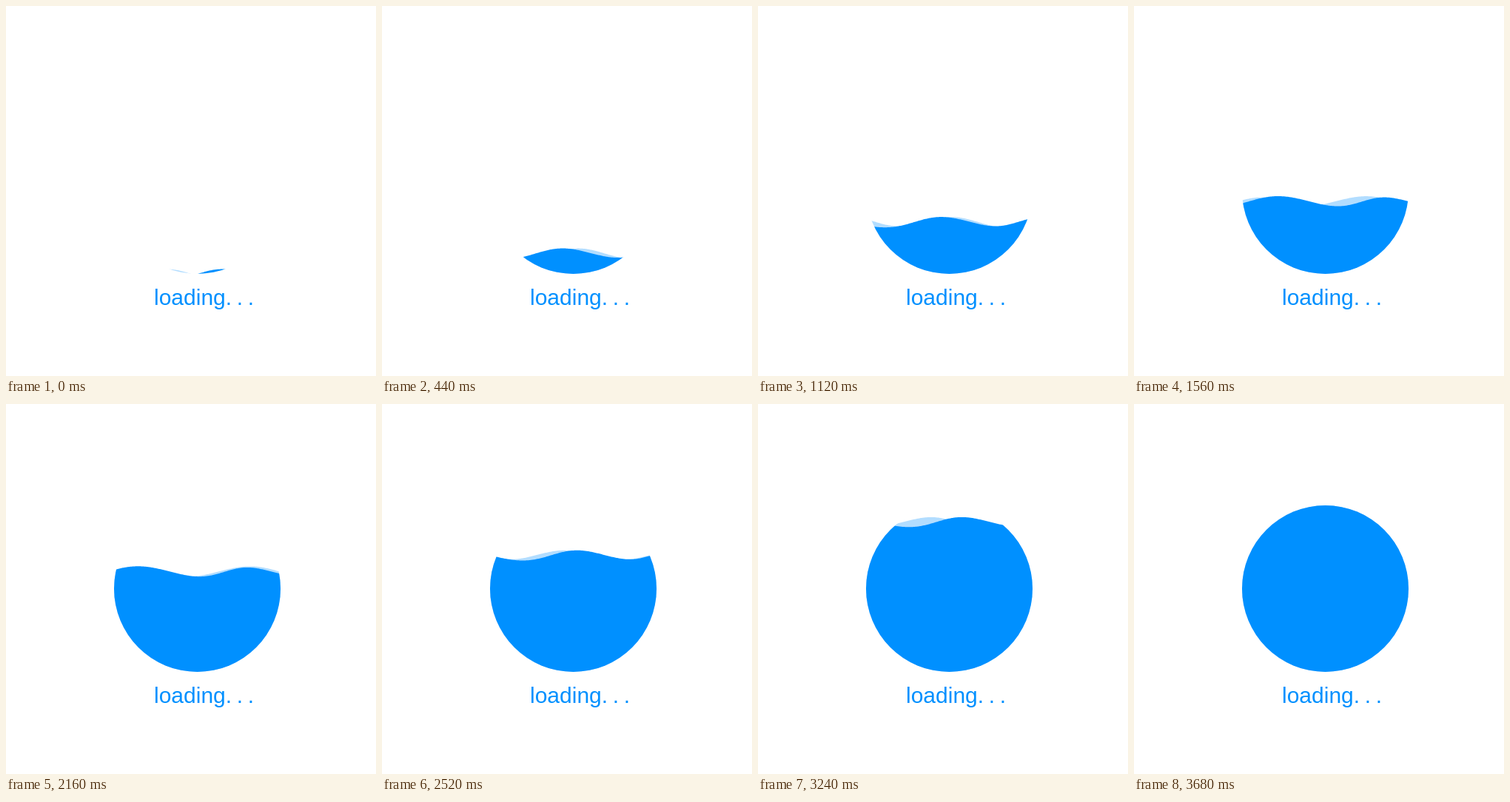
An HTML page for the animation above (5000 ms loop, 500 by 500 pixels).

```html
<!DOCTYPE html>
<html lang="en">
<head>
<meta charset="utf-8">
<title>Loading</title>
<style>
html, body { margin: 0; width: 100%; height: 100%; overflow: hidden; background: #fff; }
svg { display: block; width: 100%; height: 100%; fill: #0090ff; }
text { font: 30px "Liberation Sans", Arial, sans-serif; }
.dots { letter-spacing: 6.66px; }
</style>
</head>
<body>
<svg viewBox="0 0 500 500">
  <clipPath id="ball"><circle cx="258.5" cy="249.5" r="112.5"/></clipPath>
  <g clip-path="url(#ball)">
    <path id="back" fill-opacity=".3"/>
    <path id="front"/>
  </g>
  <text x="200" y="404">loading<tspan class="dots">...</tspan></text>
</svg>
<script>
const LOOP = 5000, STEP = 40, FULL = 92;
const MID = 258, LEFT = 144, RIGHT = 373, BOTTOM = 364;
const front = document.getElementById('front');
const back = document.getElementById('back');

// Ripple that shortens and flattens towards the side it travels to.
// dir: 1 moves right, -1 moves left; phase counts half waves.
function ripple(x, n, dir, phase) {
  const u = (x - MID) * dir;
  const a = Math.PI * (0.0137 * u + 0.0000131 * u * u - 0.12045 * n - phase);
  return (6.5 - 0.011 * u) * (Math.cos(a) - 0.043 * Math.sin(2 * a));
}

function water(n, dir, phase) {
  const level = 361.7 - 2.5 * n;
  let d = `M${LEFT} ${BOTTOM}`;
  for (let x = LEFT; x <= RIGHT; x++) {
    const y = n >= FULL ? 130 : level - ripple(x, n, dir, phase);
    d += `L${x} ${y.toFixed(2)}`;
  }
  return d + `L${RIGHT} ${BOTTOM}Z`;
}

function draw(now) {
  const n = Math.min(FULL, Math.floor((now % LOOP) / STEP));
  front.setAttribute('d', water(n, 1, 0.528));
  back.setAttribute('d', water(n, -1, 0.62));
}

const start = performance.now();
function tick() {
  draw(performance.now() - start);
  requestAnimationFrame(tick);
}
tick();
</script>
</body>
</html>
```
